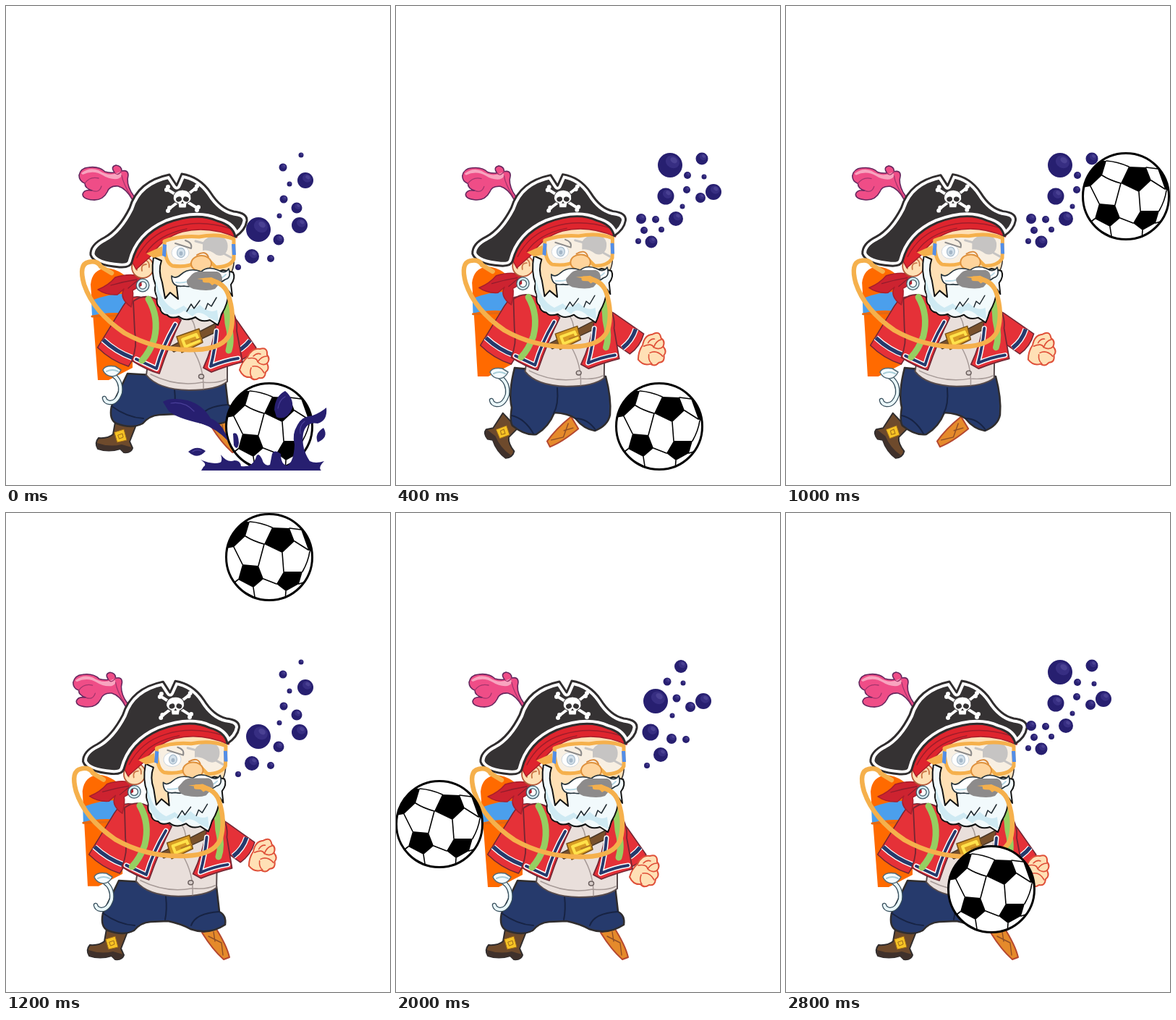
An HTML page with a canvas that plays this animation: 531x662 px, repeating every 3 s.

```html
<!DOCTYPE html>
<html lang="en">
<head>
<meta charset="utf-8">
<title>Diving pirate with a ball</title>
<style>
html, body { margin: 0; width: 100%; height: 100%; overflow: hidden; background: #fff; }
canvas { display: block; }
</style>
</head>
<body>
<canvas id="stage" width="531" height="662"></canvas>
<script>
const g = document.getElementById('stage').getContext('2d');
const STEP = 200, LOOP = 3000;
const INK = '#302d2e', RED = '#e53138', DARK_RED = '#a91e2b', NAVY = '#263a6c';
const SKIN = '#ffe0b5', HOSE = '#f5b04c', GOLD = '#f7c325', PURPLE = '#271f70';
g.lineJoin = g.lineCap = 'round';

function draw(d, fill, line, w = 1.5) {
  const p = new Path2D(d);
  if (fill) { g.fillStyle = fill; g.fill(p); }
  if (line) { g.strokeStyle = line; g.lineWidth = w; g.stroke(p); }
}
function oval(x, y, rx, ry, turn, fill, line, w = 1.5) {
  g.beginPath();
  g.ellipse(x, y, rx, ry, turn, 0, 7);
  if (fill) { g.fillStyle = fill; g.fill(); }
  if (line) { g.strokeStyle = line; g.lineWidth = w; g.stroke(); }
}
function at(x, y, turn, part) {
  g.save();
  g.translate(x, y);
  g.rotate(turn);
  part();
  g.restore();
}

// Bubbles: x, y, radius; three states take turns
const bubbles = [
  [349,309,17, 414,241,11, 406,303,11, 383,223,5.5, 408,206,3.5, 392,246,3.5, 384,267,5.5,
   402,279,7.5, 378,290,3.5, 377,323,7.5, 340,346,10, 366,349,5, 321,361,4],
  [394,212,9, 375,233,5.5, 397,235,3.5, 359,260,17, 388,256,5.5, 407,268,7, 425,260,11,
   382,280,3.5, 352,303,11.5, 381,312,7, 401,313,5, 366,334,10, 347,349,4],
  [379,220,17, 423,211,8.5, 403,234,5, 426,236,3.5, 373,263,11.5, 402,254,5, 421,265,7,
   439,257,11, 396,277,3.5, 387,294,10, 339,294,7, 359,295,5, 343,310,5, 367,309,4,
   335,325,4, 353,326,8.5]
];
function drawBubbles(list) {
  for (let i = 0; i < list.length; i += 3) {
    const [x, y, r] = list.slice(i, i + 3);
    oval(x, y, r, r, 0, PURPLE);
    oval(x + r * .2, y - r * .27, r * .58, r * .5, .5, '#372e82');
    oval(x + r * .3, y - r * .4, r * .3, r * .22, .6, '#4a4193');
  }
}

function drawBall(x, y) {
  at(x, y, 0, () => {
    oval(0, 0, 60, 60, 0, '#fff');
    g.save();
    g.clip();
    draw('M4 -41L28 -40L35 -22L18 -6L-7 -18Z M-37 10L-15 12L-8 30L-22 42L-43 31Z' +
      'M20 20L46 20L41 37L23 47L10 37Z M-60 -12L-60 -50L-27 -49L-33 -29L-49 -14Z' +
      'M44 -38L60 -42L64 -4L54 -10Z M-48 40L-20 55L-16 62L-50 60Z M54 22L62 10L62 30L51 36Z', '#000');
    draw('M4 -41Q-12 -48 -27 -49 M-7 -18L-15 12 M-33 -29Q-22 -22 -7 -18 M18 -6L20 20' +
      'M-8 30L10 37 M-37 10L-49 -14 M-43 31L-52 38 M-22 42L-20 55 M28 -40L44 -38' +
      'M35 -22L54 -10 M46 20Q54 6 56 -8 M23 47L22 60 M41 37L51 34', null, '#000', 1.6);
    g.restore();
    oval(0, 0, 59.5, 59.5, 0, null, '#000', 3);
  });
}

function drawSplash(x, y) {
  at(x - 364, y - 581, 0, () => {
    draw('M217 547Q227 540 251 545Q272 551 283 570Q300 576 307 601Q291 584 270 577Q237 570 225 560Z' +
      'M270 642L273 637Q279 633 269 627Q285 634 296 631Q300 629 297 620Q306 632 316 628Q324 628 325 636' +
      'Q340 638 345 626Q348 614 354 626Q357 637 365 634L368 619Q371 612 380 619Q380 634 389 635' +
      'Q398 630 399 606Q395 592 403 579Q409 567 424 566Q435 562 443 555Q445 573 431 577' +
      'Q415 574 411 591Q408 611 420 629Q428 633 440 629Q431 638 436 642Z', PURPLE);
    draw('M252 616Q264 606 276 615Q265 628 252 616Z M371 558Q372 539 386 532Q398 542 396 556Q388 574 374 568Z' +
      'M431 603Q426 591 439 583Q447 596 431 603Z M314 591Q321 587 322 604Q320 616 315 607Z', PURPLE);
    draw('M228 549Q247 546 260 560 M376 556Q378 544 386 540 M407 591Q405 580 413 574 M258 616Q264 612 270 615', null, '#4a3f99', 1.2);
  });
}

// Poses: body matrix (a, c, d, e), legs, arms, boot and peg placement
const standLegs = 'M168 508Q155 535 146 553Q142 572 153 577Q174 585 189 577Q198 566 212 565L236 564' +
  'Q255 568 267 575Q292 584 315 569Q317 556 307 551L303 516Z';
const standFolds = 'M146 553Q168 569 190 570 M233 530Q235 548 232 562 M268 570Q274 553 307 551';
const stand = (dx, m) => ({
  m, legs: standLegs, folds: standFolds, legX: dx,
  left: [183 + dx, 428, 148 + dx, 485], hook: [147 + dx, 501, 0],
  right: [306 + dx, 445, 332 + dx, 482], fist: [343 + dx, 494, 0],
  boot: [157 + dx, 594, 0, 1], peg: [291 + dx, 577, 0]
});
const rest = stand(0, [1, 0, 1, 0]);
const lean = stand(3, [1, 0, 1, 3]);
const step = Object.assign(stand(-12, [.995, -.02, .995, -3]), {
  right: [296, 442, 334, 469], fist: [353, 474, -.25]
});
const run = {
  m: [.977, -.015, .98, -3.4], legX: 0,
  legs: 'M164 500Q155 535 160 555Q157 574 161 580Q178 594 194 592Q211 582 219 562Q238 563 248 570' +
    'Q260 585 275 587Q293 580 296 565Q298 542 290 512Z',
  folds: 'M160 566Q178 570 190 591 M223 528Q225 551 218 563 M248 570Q265 570 276 586',
  left: [171, 428, 138, 482], hook: [143, 504, 0], right: [294, 440, 333, 467],
  fist: [352, 475, -.25], boot: [149, 590, .95, -1], peg: [246, 575, 1.45]
};
const kick = {
  m: [.97, -.03, .965, .8], legX: 0,
  legs: 'M160 490Q149 510 158 540Q155 564 161 581Q172 590 196 588Q213 583 229 560Q246 558 260 573' +
    'Q270 583 276 585Q300 583 313 562Q307 551 295 550Q294 525 286 510Z',
  folds: 'M158 541Q173 545 172 586 M222 525Q226 545 224 562 M273 581Q280 558 296 550',
  left: [167, 424, 105, 440], hook: [98, 456, .55], right: [285, 428, 346, 439],
  fist: [368, 436, -.45], boot: [141, 557, 1.9, -1], peg: [295, 578, 0]
};

function sleeve([x1, y1, x2, y2], r) {
  const len = Math.hypot(x2 - x1, y2 - y1);
  at(x1, y1, Math.atan2(y2 - y1, x2 - x1), () => {
    draw(`M0 ${-r}Q${-r} ${-r} ${-r} 0Q${-r} ${r} 0 ${r}L${len} ${r}Q${len + 6} 0 ${len} ${-r}Z`, RED, '#722633', 1.5);
    const cuff = `M${len - 13} ${1 - r}Q${len - 8} 0 ${len - 13} ${r - 1}`;
    g.lineCap = 'butt';
    draw(cuff, null, '#fff', 8);
    draw(cuff, null, NAVY, 5.5);
  });
}
function drawHook([x, y, turn]) {
  at(x, y, turn, () => {
    const curve = 'M1 9Q13 17 11 33Q6 48 -4 47Q-10 46 -11 41';
    draw(curve, null, '#354d5b', 6.5);
    draw(curve, null, '#eaf7fa', 4);
    draw('M-13 2Q-10 -5 4 -3L12 2Q8 10 0 11Q-10 10 -13 2Z', '#f5fcff', '#536a75', 1.5);
    draw('M-8 4Q0 0 8 4', null, '#a9ced8', 2);
  });
}
function drawFist([x, y, turn]) {
  at(x, y, turn, () => {
    draw('M-20 9Q-17 -2 -9 -9Q-3 -22 8 -20Q19 -23 18 -12Q23 -6 18 0Q22 8 16 12Q15 22 7 20Q0 25 -5 19Q-15 20 -20 9Z', SKIN, '#df5039', 2);
    draw('M-8 -7Q4 -9 5 -2Q10 -10 18 -10 M5 -2Q12 4 18 0 M-2 4Q8 2 14 13 M-4 6Q-7 14 -3 19 M-1 -10Q4 -15 9 -13', null, '#df5039', 1.6);
  });
}
function drawBoot([x, y, turn, side]) {
  at(x, y, turn, () => {
    g.scale(side, 1);
    draw('M-6 -19L23 -15L14 8L18 17Q16 24 6 23L1 18Q-15 23 -30 18Q-35 10 -29 3Q-16 4 -9 -2Z', '#6e4a2c', INK, 2);
    draw('M-31 10Q-14 16 3 12L17 16Q16 24 6 23L1 18Q-16 23 -30 18Z', '#40312b');
    draw('M-7 -5L6 -9L10 6L-3 9Z M-2 -1L4 -3L5 2L0 4Z', GOLD, '#9e6a18', 1);
  });
}
function drawPeg([x, y, turn]) {
  at(x, y, turn, () => {
    draw('M-8 3L10 -5Q26 20 30 37L22 40Q7 27 -8 3Z', '#e58a2b', '#b54831', 2);
    draw('M1 8L19 17L21 34 M10 15L8 2', null, '#8f4e27', 1.4);
  });
}

function drawBack() {
  draw('M175 268Q166 252 155 249Q143 248 140 257Q134 269 120 268Q106 267 106 260Q108 253 119 255' +
    'Q109 252 109 245Q101 242 101 234Q103 224 114 223Q129 221 137 229Q144 231 150 230Q144 222 152 220' +
    'Q160 221 160 228Q169 226 169 234Q166 244 173 257L179 266Z', '#ef4d87', '#65275e', 1.6);
  draw('M104 231Q115 222 128 227Q142 236 153 231L158 229Q163 236 154 239Q143 240 134 234Q121 226 106 233Z', '#f8a4bf');
  draw('M109 245Q116 235 128 238 M119 255Q129 259 132 249 M150 230Q154 236 160 228 M160 234Q162 246 173 263', null, '#a4356d', 1.3);
  draw('M117 385Q119 364 139 362Q163 365 175 385L175 500L142 517L127 517L122 450Z', '#ff6a00');
  draw('M118 407Q145 396 175 398L175 426Q145 421 119 428Z', '#4b9fec');
  draw('M119 429L175 427', null, '#e36812', 3);
}

function drawTorso() {
  draw('M205 425L300 425Q307 470 306 519Q292 531 253 531Q210 530 194 510Z', '#e9dfdb', '#574b4c', 2);
  draw('M256 432Q267 448 258 474Q274 500 273 529 M200 509Q236 527 272 520Q292 522 304 516', null, '#a69a97', 1.5);
  oval(270, 512, 3.5, 3, 0, '#d7cdca', '#695e5d', 1.5);
  draw('M225 472L291 438L296 448L232 478Z', '#7a512c', '#493728', 1.5);
  draw('M236 457L267 446L272 465L243 479Z', '#d89c23', '#795018', 1.5);
  draw('M244 461L263 454L267 463L248 471Z', null, '#ffe24b', 4);
  draw('M256 464L270 459', null, '#b77b23', 2);
  draw('M176 408Q192 396 211 407L242 434Q226 466 212 508Q194 503 174 490Q182 470 178 450Z', RED, '#752633', 1.8);
  draw('M180 488L208 501Q216 471 234 440', null, '#fff', 7);
  draw('M180 488L208 501Q216 471 234 440', null, NAVY, 4);
  draw('M291 438L307 413Q321 430 319 449L327 492Q304 498 284 506L273 500Q286 472 291 438Z', RED, '#752633', 1.8);
  draw('M291 449Q289 475 283 498Q302 490 321 487', null, '#fff', 7);
  draw('M291 449Q289 475 283 498Q302 490 321 487', null, NAVY, 4);
  draw('M197 405Q212 430 205 460Q199 478 188 490 M300 395Q306 418 307 438Q313 461 308 476', null, '#96cf61', 9);
}

function drawHead() {
  draw('M186 373Q169 369 151 375Q142 386 127 392Q139 400 154 399L163 391Q156 404 173 416Q177 400 175 393L187 386Z', '#cd2330', DARK_RED, 1.5);
  draw('M145 386Q162 381 181 378 M169 390L181 380', null, '#8f1c2c', 1.3);
  draw('M204 340Q215 310 255 306Q300 302 314 318L315 345Q317 365 306 376L240 408L212 404Z', SKIN, INK, 1.5);
  oval(189, 361, 15, 15, 0, SKIN, '#b55a37', 1.8);
  draw('M181 365Q180 351 192 351Q199 353 198 361 M188 366Q186 357 194 357', null, '#c97847', 1.8);
  oval(189, 386, 7, 7, 0, null, '#415a67', 5);
  oval(189, 386, 7, 7, 0, null, '#d6edf3', 2.5);
  draw('M204 347Q200 370 207 386Q204 393 209 402Q207 413 213 417Q214 426 223 427Q228 433 239 429Q248 437 262 430' +
    'Q270 438 282 434L293 441Q296 434 298 426Q307 412 308 394L313 401L311 385Q318 376 314 368L300 365' +
    'L242 383L236 388L238 405L227 396L220 404L216 382Q210 366 215 352Z', '#f2fafc', '#111', 2);
  draw('M207 377Q206 411 222 425Q239 428 246 421L258 429Q266 418 281 431L294 437L292 420Q281 426 268 413' +
    'Q254 424 246 414L234 420Q213 410 207 377Z', '#cfeaf3');
  draw('M250 422L256 412L260 418L268 407 M276 419L279 411L284 415L291 403', null, '#202a30', 1.5);
  draw('M174 353Q184 313 221 300Q266 282 302 293Q325 302 319 320Q280 303 244 312Q217 320 201 345L180 364Z', '#df252e', DARK_RED, 1.5);
  draw('M181 348Q197 316 231 306Q269 294 312 308 M194 341Q210 316 250 308', null, '#9f1d2a', 1.4);
}

function drawHat() {
  const d = 'M226 233L236 248L243 232Q268 236 283 258Q297 280 315 284Q334 286 333 297Q331 310 317 319' +
    'Q314 303 292 297Q264 284 222 300Q183 317 174 354Q172 362 157 361Q122 358 117 344Q116 330 136 320' +
    'Q156 309 171 279Q182 242 226 233Z';
  draw(d, '#353233');
  g.save();
  g.clip(new Path2D(d));
  draw(d, null, '#fff', 11);
  g.restore();
  draw(d, null, INK, 3);
  draw('M224 254L264 279 M262 252L226 280', null, '#fff', 4);
  for (const [x, y] of [[223, 252], [263, 251], [225, 281], [265, 280]]) {
    oval(x - 1, y + 2, 3, 3, 0, '#fff');
    oval(x + 1, y - 2, 3, 3, 0, '#fff');
  }
  draw('M231 266Q231 255 244 254Q257 255 256 267Q254 272 250 273L249 279L239 279L238 273Q233 272 231 266Z', '#fff', '#353233', 1);
  oval(239, 267, 4, 3.5, -.3, '#353233');
  oval(249, 267, 4, 3.5, .3, '#353233');
  draw('M244 270L242 273L246 273Z', '#353233');
}

function drawMask() {
  draw('M194 342L216 332L217 345L204 348Z', HOSE);
  const lens = 'M219 325Q240 317 267 319Q294 314 315 322L315 350Q309 361 290 361L280 351Q270 342 263 354Q251 362 230 359Q219 354 219 325Z';
  draw(lens, '#f8efe2');
  oval(241, 341, 12, 10, 0, '#fff', '#d1d8de', 1);
  oval(242, 341, 5.5, 6.5, 0, '#d5e2ec', '#a9bccc', 1.3);
  oval(242, 342, 2.5, 3, 0, '#a5b7c8');
  draw('M234 328L256 335Q258 327 248 324', null, '#8d8b8a', 2);
  draw('M272 327Q279 315 297 318Q309 323 306 337Q302 348 291 344Q280 336 272 338Z', '#c6c4c3');
  draw('M262 325L277 329 M301 342L312 348', null, '#c6c4c3', 3);
  draw(lens, null, HOSE, 5);
  draw('M217 329L222 330L221 347L216 345Z M312 329L317 329L318 344L313 344Z', '#528ee8');
  oval(270, 356, 14, 11, 0, '#ffd49c', '#df913c', 2);
  draw('M264 344Q276 337 280 347', null, '#d88636', 1.8);
  draw('M270 367Q253 361 242 371Q234 378 229 373Q229 390 246 387Q261 390 272 379Q291 388 303 378Q312 376 308 363Q303 371 293 365Q279 359 270 367Z', '#fff', '#26343c', 1.7);
  draw('M235 382Q249 384 262 376 M286 377Q297 379 304 371', null, '#b8d9e5', 2);
}

function drawHose() {
  draw('M257 371Q263 366 272 367L292 367Q299 369 299 379L289 391Q279 395 259 391Q249 387 250 379Z', '#8d8b8b');
  draw('M264 377L284 375L295 380L285 386L278 379Z', HOSE);
  draw('M275 379Q300 379 307 398Q317 427 310 452Q301 474 262 475Q208 477 164 452Q121 423 108 385Q100 357 114 354Q126 351 131 360L146 369', null, HOSE, 6.5);
}

function drawPirate(p) {
  const [a, c, d, e] = p.m;
  const onBody = (...parts) => {
    g.save();
    g.transform(a, 0, c, d, e, 265 * (1 - d));
    parts.forEach(part => part());
    g.restore();
  };
  onBody(drawBack);
  drawBoot(p.boot);
  drawPeg(p.peg);
  at(p.legX, 0, 0, () => {
    draw(p.legs, NAVY, INK, 2.5);
    draw(p.folds, null, '#172343', 2);
  });
  sleeve(p.right, 17);
  drawFist(p.fist);
  drawHook(p.hook);
  sleeve(p.left, 25);
  onBody(drawTorso, drawHead, drawHat, drawMask, drawHose);
}

// Each step: pose, ball centre, splash
const steps = [
  [rest, 364, 581, true], [lean, 364, 581], [run, 364, 581], [kick, 364, 581, true],
  [kick, 470, 439], [run, 470, 263], [step, 364, 61], [lean, 255, 170],
  [rest, 161, 122], [lean, 60, 275], [rest, 60, 430], [rest, 60, 581, true],
  [rest, 161, 520], [rest, 225, 601, true], [rest, 284, 520]
];

function frame(now) {
  const i = Math.floor(now % LOOP / STEP);
  const [pose, x, y, wet] = steps[i];
  g.fillStyle = '#fff';
  g.fillRect(0, 0, 531, 662);
  drawPirate(pose);
  drawBubbles(bubbles[i % 3]);
  drawBall(x, y);
  if (wet) drawSplash(x, y);
  requestAnimationFrame(frame);
}
frame(0);
</script>
</body>
</html>
```
